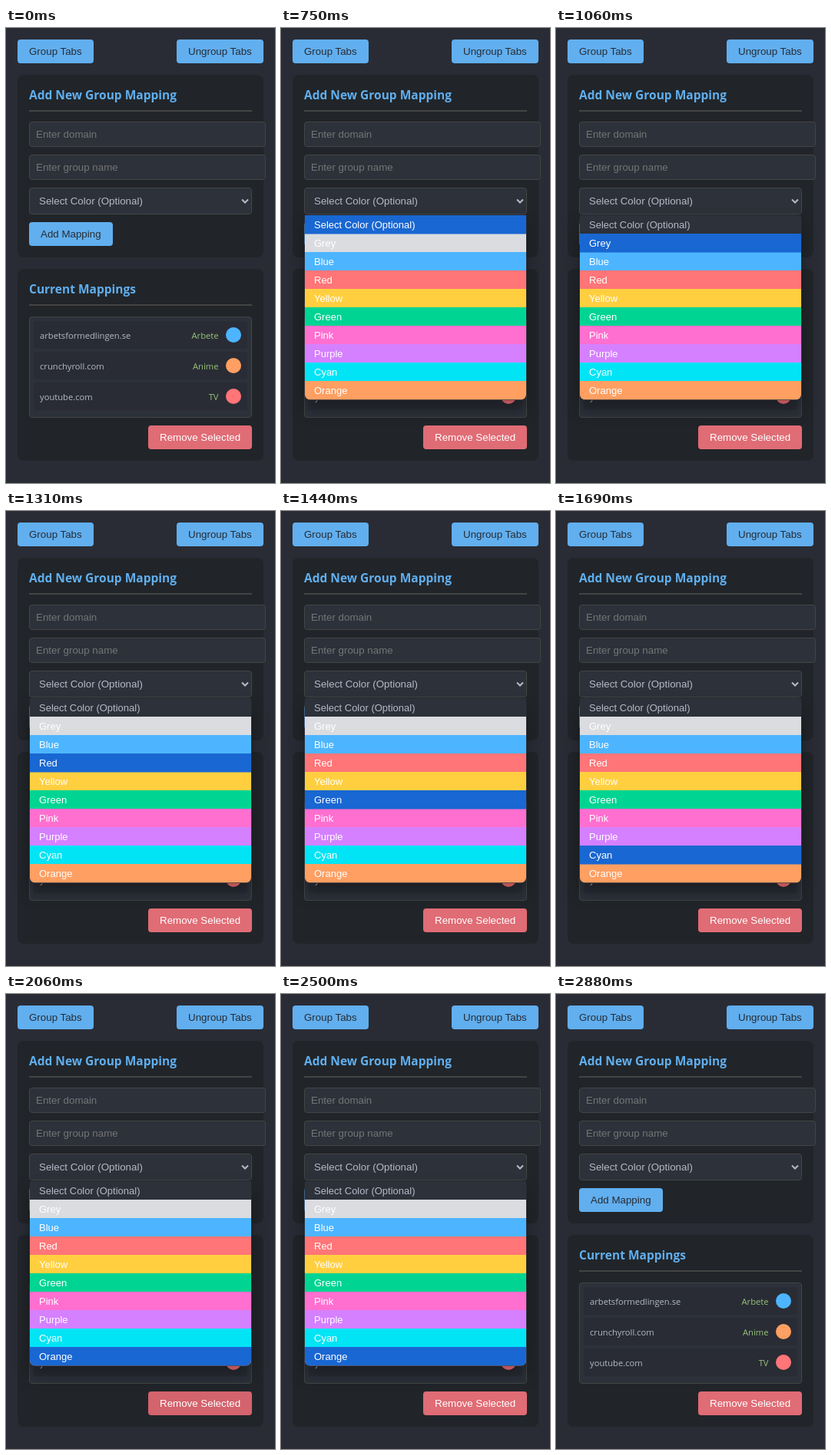
An HTML page for the animation above (3000 ms loop, 350 by 593 pixels).

```html
<!DOCTYPE html>
<html lang="en">
<head>
<meta charset="utf-8">
<title>Group mappings</title>
<style>
  html, body { margin: 0; width: 100%; height: 100%; overflow: hidden; background: #292c35; }
  svg { display: block; width: 350px; height: 593px; font: 13.333px "Liberation Sans", Arial, sans-serif; }
  .panel { fill: #212529; }
  .rule { fill: #444; }
  .field { fill: #2c313a; stroke: #444; }
  .btn { fill: #61afef; }
  .btn-text { fill: #282c34; }
  .title { font: bold 15.5px "Open Sans", "Noto Sans", sans-serif; fill: #61afef; }
  .hint { fill: #757575; }
  .value { fill: #b4bac6; }
  .item { fill: #292c35; }
  .list { font: 11.2px "Open Sans", "Noto Sans", sans-serif; }
  .group { fill: #98c379; text-anchor: end; }
  .remove { fill: #e06c75; animation: hover 3s linear infinite; }
  .menu { font-size: 13px; fill: #fff; visibility: hidden; animation: open 3s step-end infinite; }
  .shade { fill: #2c313a; filter: drop-shadow(0 12px 10px rgba(0, 0, 0, .32)); }
  .cursor { fill: #1967d2; animation: pick 3s step-end infinite; }
  .first { animation: first 3s step-end infinite; }

  @keyframes open {
    0%, 96% { visibility: hidden; }
    25% { visibility: visible; }
  }
  @keyframes pick {
    0% { transform: translateY(0); }
    35.333% { transform: translateY(24px); }
    39.667% { transform: translateY(48px); }
    43.667% { transform: translateY(72px); }
    46% { transform: translateY(96px); }
    48% { transform: translateY(120px); }
    52% { transform: translateY(144px); }
    54.333% { transform: translateY(168px); }
    56.333% { transform: translateY(192px); }
    60.333%, 100% { transform: translateY(216px); }
  }
  @keyframes first {
    0% { fill: #fff; }
    35.333%, 100% { fill: #b4bac6; }
  }
  @keyframes hover {
    0%, 64% { fill: #e06c75; }
    71%, 73% { fill: #cd5f69; }
    83.333%, 100% { fill: #e06c75; }
  }
</style>
</head>
<body>
<svg viewBox="0 0 350 593">
  <defs>
    <clipPath id="menu-shape">
      <path d="M31 244H319V477.500a7 7 0 0 1-7 7H38a7 7 0 0 1-7-7Z"/>
    </clipPath>
  </defs>

  <rect class="btn" x="15" y="15" width="99" height="31" rx="4"/>
  <text class="btn-text" x="30" y="35">Group Tabs</text>
  <rect class="btn" x="222" y="15" width="113" height="31" rx="4"/>
  <text class="btn-text" x="237" y="35">Ungroup Tabs</text>

  <rect class="panel" x="15" y="61" width="320" height="238" rx="8"/>
  <text class="title" x="30" y="93">Add New Group Mapping</text>
  <rect class="rule" x="30" y="107" width="290" height="2"/>
  <rect class="field" x="30.5" y="122.500" width="307" height="32" rx="3.500"/>
  <text class="hint" x="39" y="143">Enter domain</text>
  <rect class="field" x="30.5" y="165.500" width="307" height="32" rx="3.500"/>
  <text class="hint" x="39" y="186">Enter group name</text>
  <rect class="field" x="30.5" y="208.500" width="289" height="34" rx="3.500"/>
  <text class="value" x="43" y="230">Select Color (Optional)</text>
  <path d="M307 223.500l4 4 4-4" fill="none" stroke="#b4bac6" stroke-width="2"/>
  <rect class="btn" x="30" y="253" width="109" height="31" rx="4"/>
  <text class="btn-text" x="45" y="273">Add Mapping</text>

  <rect class="panel" x="15" y="314" width="320" height="250" rx="8"/>
  <text class="title" x="30" y="346">Current Mappings</text>
  <rect class="rule" x="30" y="360" width="290" height="2"/>
  <rect class="field" x="30.5" y="376.500" width="289" height="131" rx="3.500"/>
  <g class="list" id="list"></g>
  <rect class="remove" x="185" y="518" width="135" height="31" rx="4"/>
  <text x="200" y="538" fill="#fff">Remove Selected</text>

  <g class="menu">
    <rect class="shade" x="30.500" y="243.500" width="289" height="241.500" rx="7"/>
    <g clip-path="url(#menu-shape)">
      <g id="rows"></g>
      <rect class="cursor" x="31" y="244" width="288" height="24.500"/>
    </g>
    <g id="labels"></g>
  </g>
</svg>
<script>
  const add = (parent, tag, attrs, text = "") => {
    const el = document.createElementNS("http://www.w3.org/2000/svg", tag);
    for (const key in attrs) el.setAttribute(key, attrs[key]);
    el.textContent = text;
    document.getElementById(parent).append(el);
  };

  const mappings = [
    ["arbetsformedlingen.se", "Arbete", "#4db5ff"],
    ["crunchyroll.com", "Anime", "#ff9f62"],
    ["youtube.com", "TV", "#ff7578"]
  ];
  mappings.forEach(([domain, group, color], i) => {
    const y = 382 + 40 * i;
    add("list", "rect", { class: "item", x: 36, y, width: 278, height: 36, rx: 3 });
    add("list", "text", { class: "value", x: 44, y: y + 23 }, domain);
    add("list", "text", { class: "group", x: 276.5, y: y + 23 }, group);
    add("list", "circle", { cx: 296, cy: y + 18, r: 10, fill: color });
  });

  const options = [
    ["Select Color (Optional)", "#2c313a"],
    ["Grey", "#dadce0"],
    ["Blue", "#4db5ff"],
    ["Red", "#ff7578"],
    ["Yellow", "#ffcf40"],
    ["Green", "#00d492"],
    ["Pink", "#ff6fd0"],
    ["Purple", "#d580ff"],
    ["Cyan", "#00e4f5"],
    ["Orange", "#ff9f62"]
  ];
  options.forEach(([label, fill], i) => {
    const y = 244 + 24 * i;
    add("rows", "rect", { x: 31, y, width: 288, height: 24.5, fill });
    add("labels", "text", { class: i ? "" : "first", x: 43, y: y + 17 }, label);
  });
</script>
</body>
</html>
```
